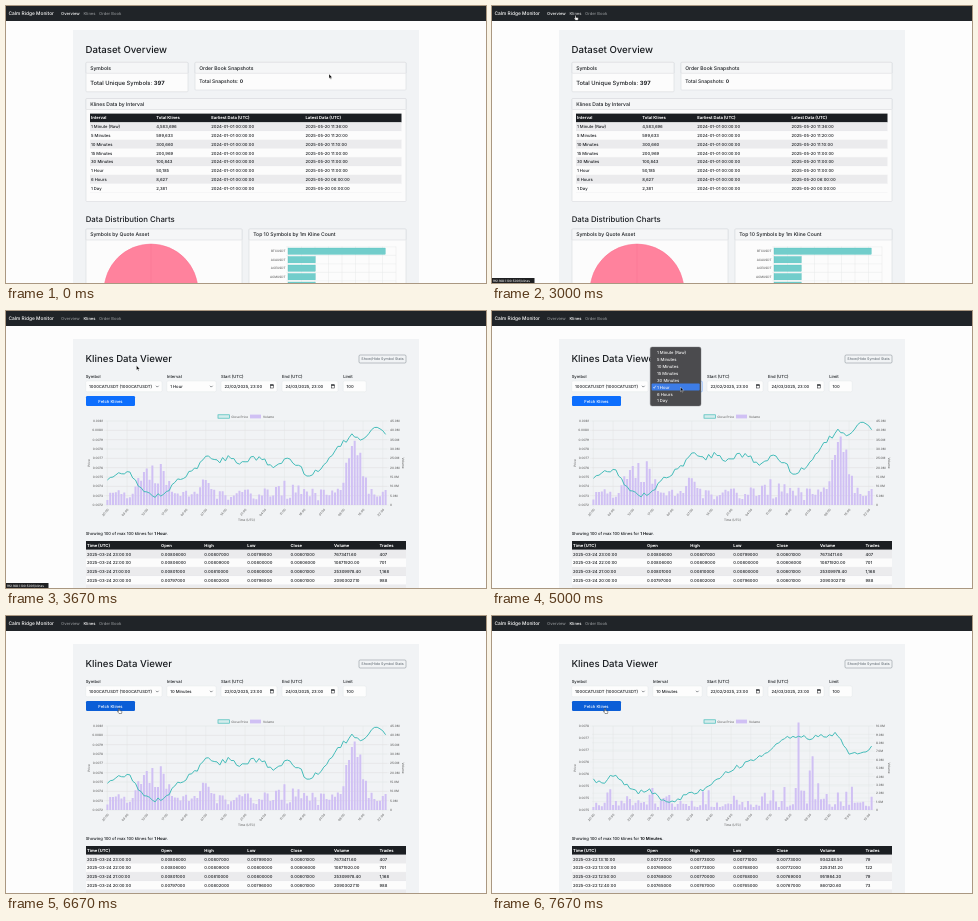
An HTML page for the animation above (8000 ms loop, 480 px wide and 277 px high).

```html
<!DOCTYPE html>
<html lang="en">
<head>
<meta charset="utf-8">
<title>Calm Ridge Monitor</title>
<style>
  html, body { margin: 0; width: 100%; height: 100%; overflow: hidden; background: #fdfdfd; }
  svg { display: block; width: 480px; height: 277px; }
  text {
    font-family: Inter, Roboto, "Liberation Sans", sans-serif; font-weight: 450;
    text-rendering: geometricPrecision; white-space: pre;
  }
</style>
</head>
<body>
<svg id="stage" viewBox="0 0 480 277"></svg>
<script>
const NS = "http://www.w3.org/2000/svg";
const stage = document.getElementById("stage");
const LOOP = 8000, TICK = 1000 / 3;
const INK = "#181b1f", BAR = "#202428", DIM = "#8d9093", TEAL = "#43bcb9", LILAC = "#d0c0f4";

function add(parent, tag, attrs = {}, content) {
  const node = document.createElementNS(NS, tag);
  for (const key in attrs) node.setAttribute(key, attrs[key]);
  if (content !== undefined) node.textContent = content;
  return parent.appendChild(node);
}
const group = (parent = stage) => add(parent, "g");
const rect = (g, x, y, width, height, fill, more) =>
  add(g, "rect", { x, y, width, height, fill, ...more });
const line = (g, x1, y1, x2, y2, stroke, width = 0.4) =>
  add(g, "line", { x1, y1, x2, y2, stroke, "stroke-width": width });
// y is the vertical middle of the capitals
const label = (g, x, y, str, size = 4.18, more) =>
  add(g, "text", { x, y: y + size * 0.36, "font-size": size, fill: INK, ...more }, str);
const show = (node, on) => node.setAttribute("display", on ? "inline" : "none");
const bold = { style: "font-weight: 700" }, medium = { style: "font-weight: 500" };
const middle = { "text-anchor": "middle" }, end = { "text-anchor": "end" };

function card(g, x, y, w, h, title) {
  const edge = { stroke: "#d3d5d8", "stroke-width": 0.5, rx: 0.8 };
  rect(g, x, y, w, h, "#fcfcfc", edge);
  rect(g, x, y, w, 11, "#f5f6f7", edge);
  label(g, x + 4.2, y + 5.5, title, 5.05, medium);
}

function table(g, x, y, w, cols, head, rows) {
  const pitch = 8.76;
  rect(g, x, y, w, pitch, "#1b1e22");
  head.forEach((str, i) => label(g, cols[i], y + pitch / 2, str, 4.15, { ...bold, fill: "#fff" }));
  rows.forEach((row, r) => {
    const top = y + pitch * (r + 1);
    rect(g, x, top, w, pitch, r % 2 ? "#fcfcfc" : "#ebebed");
    line(g, x, top + pitch, x + w, top + pitch, "#dfe1e4", 0.3);
    row.forEach((str, i) => label(g, cols[i], top + pitch / 2, str));
  });
}

// --- Overview page
const overview = group();
rect(overview, 67, 24, 346, 253, "#f1f3f5");
label(overview, 79.5, 44, "Dataset Overview", 9.65, medium);
card(overview, 80, 56.3, 102, 29.5, "Symbols");
card(overview, 189, 56.3, 211, 27.7, "Order Book Snapshots");
const total = (x, y, str, value, size) =>
  add(label(overview, x, y, str, size), "tspan", bold, value);
total(84.2, 76.5, "Total Unique Symbols: ", "397", 5.8);
total(193.2, 75.7, "Total Snapshots: ", "0", 4.95);
card(overview, 80, 92.5, 320, 103, "Klines Data by Interval");
const intervals = ["1 Minute (Raw)", "5 Minutes", "10 Minutes", "15 Minutes",
  "30 Minutes", "1 Hour", "6 Hours", "1 Day"];
const counts = "4,583,696 599,633 300,660 200,969 100,843 50,185 8,627 2,381".split(" ");
const latest = "11:36 11:20 11:10 11:00 11:00 11:00 06:00 00:00".split(" ");
table(overview, 84, 107.6, 311.5, [85, 150.3, 205.3, 299.5],
  ["Interval", "Total Klines", "Earliest Data (UTC)", "Latest Data (UTC)"],
  intervals.map((name, i) => [name, counts[i], "2024-01-01 00:00:00", `2025-05-20 ${latest[i]}:00`]));
label(overview, 79.7, 213.5, "Data Distribution Charts", 7.8, medium);
card(overview, 80, 223, 156, 60, "Symbols by Quote Asset");
add(overview, "circle", { cx: 145, cy: 285, r: 47, fill: "#ff829d", stroke: "#f8708e", "stroke-width": 0.5 });
line(overview, 145, 238, 145, 277, "#f4718d");
card(overview, 243, 223, 157, 60, "Top 10 Symbols by 1m Kline Count");
for (let x = 282; x <= 390; x += 13.5) line(overview, x, 240.5, x, 277, "#e4e5e6");
["BTCUSDT", "ACAUSDT", "ACEUSDT", "ACMUSDT", ""].forEach((name, i) => {
  const y = 245.2 + i * 8.5;
  line(overview, 280, y - 4.3, 390, y - 4.3, "#e4e5e6");
  label(overview, 279.5, y, name, 3.1, { ...end, fill: "#666" });
  rect(overview, 282, y - 3.2, i ? 27.3 : 97.3, 6.4, "#72cdcb", { stroke: TEAL, "stroke-width": 0.3 });
});

// --- Klines page
const klines = group();
rect(klines, 67, 28, 346, 249, "#f1f3f5");
label(klines, 79.5, 47.3, "Klines Data Viewer", 9.65, medium);
rect(klines, 353, 44, 47, 8, "none", { rx: 1.2, stroke: "#7d858c", "stroke-width": 0.5 });
label(klines, 376.5, 48, "Show/Hide Symbol Stats", 3.6, { ...middle, fill: "#6c757d" });

function field(x, w, name, value) {
  label(klines, x, 65, name);
  const box = rect(klines, x, 70, w, 10.8, "#fdfdfd", { rx: 1.4, stroke: "#dee2e6", "stroke-width": 0.4 });
  return { box, value: label(klines, x + 3.4, 75.4, value) };
}
const chevron = x => add(klines, "path",
  { d: `M${x} 74.8l1.3 1.3 1.3-1.3`, fill: "none", stroke: "#343a40", "stroke-width": 0.6 });
function calendar(x) {
  rect(klines, x, 73.8, 3.2, 3.2, "none", { stroke: INK, "stroke-width": 0.5 });
  rect(klines, x, 73.6, 3.2, 1.1, INK);
}
field(79.7, 76.3, "Symbol", "1000CATUSDT (1000CATUSDT)");
chevron(150);
const interval = field(160.8, 49.4, "Interval", "1 Hour");
chevron(204);
field(215, 56, "Start (UTC)", "22/02/2025, 23:00");
calendar(264.3);
field(276, 56, "End (UTC)", "24/03/2025, 23:00");
calendar(325.3);
field(337.2, 23, "Limit", "100");

const button = rect(klines, 80, 85, 49, 10, "", { rx: 1.2 });
label(klines, 104.5, 90, "Fetch Klines", 4.18, { ...middle, ...medium, fill: "#fff" });

// --- Price and volume charts
const LEFT = 100, RIGHT = 381, TOP = 110, BASE = 194, COUNT = 100;
const SLOT = (RIGHT - LEFT) / COUNT;
const slotX = i => LEFT + (i + 0.5) * SLOT;
const hump = (i, centre, width) => Math.exp(-(((i - centre) / width) ** 2));

function random(seed) {
  return () => (seed = (seed * 16807) % 2147483647) / 2147483647;
}

// Evenly spaced key levels, joined by straight runs
function along(keys, i) {
  const at = i / (COUNT - 1) * (keys.length - 1);
  const k = Math.min(keys.length - 2, Math.floor(at));
  return keys[k] + (keys[k + 1] - keys[k]) * (at - k);
}

function makeChart({ start, seed, levels, volume, topPrice, priceStep, priceTicks, volumeStep, volumeTicks,
  firstMinute, stepMinutes }) {
  const g = group(klines), rnd = random(seed);
  const tick = { fill: "#666" };
  const two = n => String(n % 60).padStart(2, "0");

  for (let i = 0; i < COUNT; i += 7) {
    const x = slotX(i), m = firstMinute + i * stepMinutes;
    line(g, x, TOP, x, BASE + 2, "#e0e2e4");
    label(g, 0, 0, two(Math.floor(m / 60) % 24) + ":" + two(m), 3.1,
      { ...tick, ...end, transform: `translate(${x + 0.8} 198) rotate(-50)` });
  }
  for (let i = 0; i < priceTicks; i++) {
    const y = TOP + (BASE - TOP) * i / (priceTicks - 1);
    line(g, LEFT - 2, y, RIGHT, y, "#e0e2e4");
    label(g, LEFT - 3, y, (topPrice - i * priceStep).toFixed(4), 3.1, { ...tick, ...end });
  }
  for (let i = 0; i < volumeTicks; i++) {
    const y = BASE - (BASE - TOP) * i / (volumeTicks - 1);
    line(g, LEFT, y, RIGHT + 2, y, "#e0e2e4");
    label(g, RIGHT + 3, y, i ? (i * volumeStep).toFixed(1) + "M" : "0", 3.1, tick);
  }
  const title = (x, y, str, turn) => label(g, 0, 0, str, 3.1,
    { ...tick, ...middle, transform: `translate(${x} ${y}) rotate(${turn})` });
  title(83, 152, "Price", -90);
  title(397, 152, "Volume", 90);
  title(240.5, 209.3, "Time (UTC)", 0);
  rect(g, 212, 103.8, 11.5, 3.4, "#d5ecec", { stroke: TEAL, "stroke-width": 0.7 });
  label(g, 225.3, 105.5, "Close Price", 3.1, tick);
  rect(g, 244, 103.6, 11, 3.8, LILAC);
  label(g, 257, 105.5, "Volume", 3.1, tick);

  const slots = [...Array(COUNT).keys()];
  const heights = slots.map(i => volume(i, rnd()));
  const prices = slots.map(i => along(levels, i) + (rnd() - 0.5) * 5);
  const bars = add(g, "path", { fill: LILAC });
  const curve = add(g, "path", { fill: "none", stroke: TEAL, "stroke-width": 1, "stroke-linejoin": "round" });

  return (t, on) => {
    show(g, on);
    const left = 1 - Math.min(1, Math.max(0, (t - start) / 1000));
    const grown = 1 - left ** 4;
    bars.setAttribute("d", heights.map((h, i) =>
      `M${(slotX(i) - 1).toFixed(2)} ${BASE}v${(-h * grown).toFixed(2)}h2V${BASE}z`).join(""));
    curve.setAttribute("d", "M" + prices.map((h, i) =>
      `${slotX(i).toFixed(2)} ${(BASE - h * grown).toFixed(2)}`).join("L"));
  };
}

const hourly = makeChart({
  start: 3165, seed: 4711, firstMinute: 1200, stepMinutes: 60,
  levels: [28, 36, 34, 18, 9, 10, 23, 31, 39, 54, 47, 51, 44, 51, 48, 40, 50, 44, 31, 38, 49, 65, 74, 70, 82, 77],
  volume: (i, r) => 5 + 12 * r + hump(i, 17, 6) * (8 + 26 * r) + hump(i, 35, 2) * 18 +
    hump(i, 64, 5) * 10 * r + hump(i, 88, 3.5) * (50 + 18 * r),
  topPrice: 0.0081, priceStep: 0.0001, priceTicks: 10, volumeStep: 5, volumeTicks: 10
});

const tenMinutes = makeChart({
  start: 7165, seed: 977, firstMinute: 1240, stepMinutes: 10,
  levels: [31, 30, 39, 26, 19, 21, 12, 8, 14, 18, 23, 31, 40, 46, 51, 58, 64, 74, 80, 77, 78, 79, 81, 60, 60, 67],
  volume: (i, r) => 3 + 9 * r + 14 * r ** 8 + hump(i, 73, 0.7) * 74 + hump(i, 81, 8) * 36 * r ** 3,
  topPrice: 0.0078, priceStep: 0.00005, priceTicks: 8, volumeStep: 1, volumeTicks: 11
});

// --- Result tables
function results(name, rows) {
  const g = group(klines);
  const note = label(g, 79.7, 222.3, "Showing 100 of max 100 klines for ", 4.15);
  add(note, "tspan", bold, name);
  add(note, "tspan", {}, ".");
  const cells = rows.map(row => {
    const [day, time, ...rest] = row.split(" ");
    const prices = rest.splice(0, 4).map(p => `0.00${p}000`);
    return [`2025-03-${day} ${time}:00`, ...prices, ...rest];
  });
  table(g, 80, 230, 320, [81, 155, 198.3, 241.3, 284.5, 328, 373.5],
    ["Time (UTC)", "Open", "High", "Low", "Close", "Volume", "Trades"], [...cells, []]);
  return g;
}
const hourRows = results("1 Hour", [
  "24 23:00 806 807 799 801 7673411.60 407",
  "24 22:00 806 809 800 806 10871920.00 701",
  "24 21:00 801 810 800 801 25309978.40 1,168",
  "24 20:00 797 802 796 801 20903027.10 988"]);
const tenRows = results("10 Minutes", [
  "22 13:10 772 773 771 773 934248.50 79",
  "22 13:00 769 773 768 772 2253141.20 122",
  "22 12:50 768 770 768 769 951984.20 79",
  "22 12:40 765 767 765 767 860120.60 73"]);

// --- Interval menu
const menu = group();
rect(menu, 158.2, 36, 50.8, 59, "#4b4b4e", { rx: 2, stroke: "#77777a", "stroke-width": 0.4 });
const marker = rect(menu, 159.6, 0, 48.1, 7, "#3d7ce6", { rx: 1 });
const itemY = i => 41.2 + i * 6.97;
intervals.forEach((str, i) => label(menu, 165, itemY(i), str, 4.18, { fill: "#f4f4f4" }));
add(menu, "path", { d: "M161.3 76.2l.9 1.1 1.5-2.6", fill: "none", stroke: "#fff", "stroke-width": 0.6 });

// --- Navigation bar and link hint
rect(stage, 0, 0, 480, 15, BAR);
label(stage, 2.5, 7.5, "Calm Ridge Monitor", 4.85, { fill: "#fff" });
const navItem = (x, str) => label(stage, x, 7.5, str, 4.12, { fill: DIM });
const navOverview = navItem(55, "Overview");
const navKlines = navItem(77.5, "Klines");
navItem(93, "Order Book");
const hint = group();
rect(hint, 0, 272, 42.5, 5, "#1f2022");
label(hint, 0.8, 274.6, "192.168.1.100:5001/klines", 3.15, { fill: "#f0f0f0" });

// --- Pointer
const arrow = add(stage, "path", { d: "M0 0V4.6L1.1 3.6 1.8 5.2 2.5 4.9 1.8 3.4H3.2Z",
  fill: "#000", stroke: "#fff", "stroke-width": 0.35 });
const hand = add(stage, "path", { d: "M-.5.4a.5.5 0 0 1 1 0V2l2 .5q.5.2.4.9L2.5 5H0L-1.5 3q0-.6.6-.4l.4.4Z",
  fill: "#fff", stroke: "#000", "stroke-width": 0.4 });
// [first tick, x, y]
const stops = [[0, 323, 68], [2, 251, 59], [3, 89, 23], [4, 84, 12], [5, 83.5, 9.3], [11, 130.5, 54.5],
  [12, 171, 72], [13, 188.5, 76], [16, 187.5, 61], [17, 185.7, 56.5], [19, 118, 88], [20, 113, 92.5]];

function render(n) {
  const t = n * TICK;
  const onKlines = n >= 10, fetched = n >= 21;
  show(overview, !onKlines);
  show(klines, onKlines);
  hourly(t, onKlines && !fetched);
  tenMinutes(t, n >= 22);
  show(hourRows, !fetched);
  show(tenRows, fetched);

  navOverview.setAttribute("fill", onKlines ? DIM : "#fff");
  navKlines.setAttribute("fill", onKlines ? "#fff" : n >= 5 ? "#c8c9ca" : DIM);
  show(hint, n >= 6 && n <= 11);

  const focused = n >= 15 && n <= 19;
  interval.value.textContent = n >= 19 ? "10 Minutes" : "1 Hour";
  interval.box.setAttribute("stroke", focused ? "#a3c6fb" : "#dee2e6");
  interval.box.setAttribute("stroke-width", focused ? 1.2 : 0.4);
  const loading = n === 21;
  button.setAttribute("fill", n >= 19 && !loading ? "#0b5ed7" : "#0d6efd");
  button.setAttribute("stroke", loading ? "#98c1fe" : "none");

  show(menu, n >= 15 && n <= 18);
  menu.setAttribute("opacity", n === 18 ? 0.76 : 1);
  const choice = n >= 17 ? 2 : n === 16 ? 3 : 5;
  marker.setAttribute("y", itemY(choice) - 3.5);

  const [, x, y] = stops.filter(stop => stop[0] <= n).pop();
  const linking = (n >= 5 && n <= 10) || n >= 19;
  show(arrow, !linking);
  show(hand, linking);
  (linking ? hand : arrow).setAttribute("transform", `translate(${x} ${y})`);
}

// The picture steps three times a second
let shown = -1;
const origin = performance.now();
function loop(now) {
  const t = Math.max(0, now - origin) % LOOP;
  const n = Math.min(23, Math.floor((t + 4) / TICK));
  if (n !== shown) render(shown = n);
  requestAnimationFrame(loop);
}
render(0);
requestAnimationFrame(loop);
</script>
</body>
</html>
```
